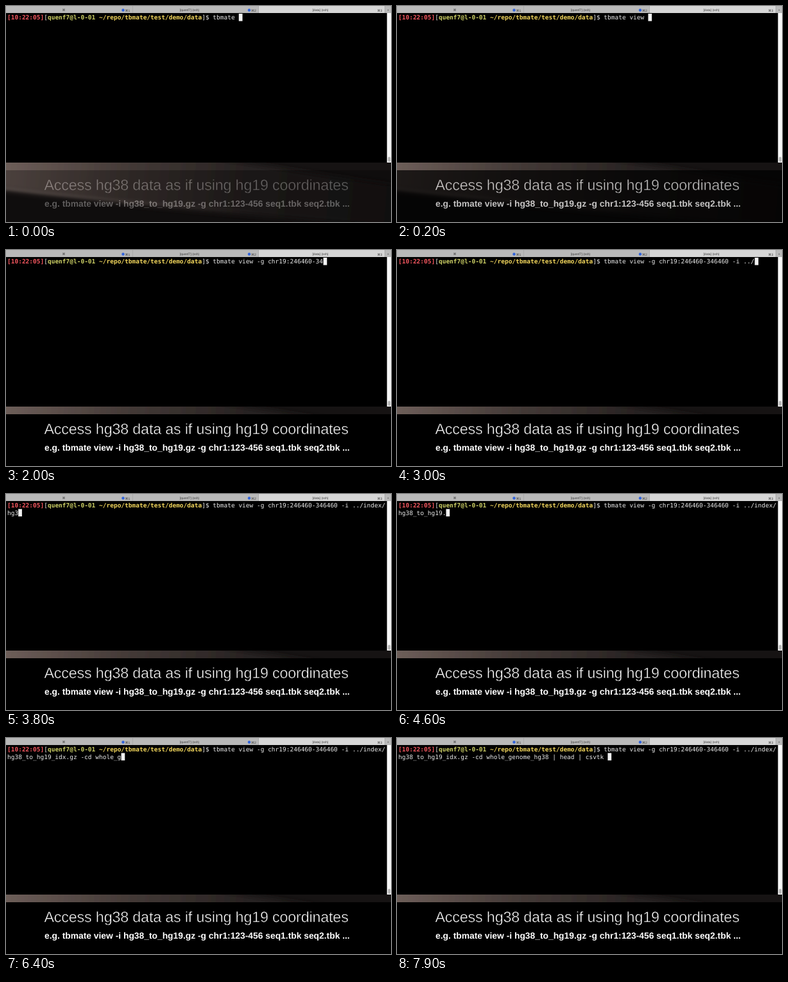
An HTML page that plays this animation: 600 px wide and 338 px high, repeating every 8 s.

```html
<!DOCTYPE html>
<html lang="en">
<head>
<meta charset="utf-8">
<title>Terminal demo</title>
<style>
  html, body { margin: 0; width: 100%; height: 100%; overflow: hidden; background: #000; }
  svg { display: block; width: 600px; height: 338px; }
  text { white-space: pre; text-rendering: geometricPrecision; }
  .term { font: 9.512px "DejaVu Sans Mono", monospace; fill: #e8e8e8; }
  .time { fill: #f4575f; font-weight: bold; }
  .user { fill: #cdd065; font-weight: bold; }
  .path { fill: #f2d65c; font-weight: bold; }
  .tab { font: 5px "Liberation Sans", "DejaVu Sans", sans-serif; fill: #3c3c3c; text-anchor: middle; }
  .title { font: 23.3px "Liberation Sans", Arial, sans-serif; letter-spacing: -.17px; fill: #fff; stroke: #000; stroke-width: .5; }
  .example { font: bold 13.84px "Liberation Sans", Arial, sans-serif; fill: #fff; }
</style>
</head>
<body>
<svg viewBox="0 0 600 338">
  <defs>
    <linearGradient id="glow" gradientUnits="userSpaceOnUse" x1="0" y1="250" x2="600" y2="300">
      <stop offset="0" stop-color="#6d5e59"/>
      <stop offset=".3" stop-color="#453b38"/>
      <stop offset=".6" stop-color="#292423"/>
      <stop offset="1" stop-color="#191616"/>
    </linearGradient>
    <linearGradient id="streak" gradientUnits="userSpaceOnUse" x1="0" y1="0" x2="400" y2="0">
      <stop offset="0" stop-color="#8c7d77" stop-opacity=".7"/>
      <stop offset="1" stop-color="#8c7d77" stop-opacity="0"/>
    </linearGradient>
    <filter id="soft" x="-20%" y="-50%" width="140%" height="200%"><feGaussianBlur stdDeviation="5"/></filter>
    <filter id="fine" x="-20%" y="-50%" width="140%" height="200%"><feGaussianBlur stdDeviation="2"/></filter>
  </defs>

  <!-- desktop -->
  <rect y="245" width="600" height="93" fill="#161313"/>
  <path d="M-30 215H190Q400 252 640 285V348Q250 320 -30 284Z" fill="url(#glow)" filter="url(#soft)"/>
  <path d="M-20 283Q160 305 400 324" fill="none" stroke="url(#streak)" stroke-width="4" filter="url(#fine)"/>

  <g id="caption">
    <rect y="257" width="600" height="81"/>
    <text class="title" x="59.5" y="288">Access hg38 data as if using hg19 coordinates</text>
    <text class="example" x="60" y="313.7">e.g. tbmate view -i hg38_to_hg19.gz -g chr1:123-456 seq1.tbk seq2.tbk ...</text>
  </g>

  <!-- terminal window -->
  <rect width="600" height="245"/>
  <rect width="600" height="11" fill="#b9b9b9"/>
  <rect x="394" width="196" height="11" fill="#d6d6d6"/>
  <path d="M197.5 0V11M393.5 0V11M590.5 0V11" stroke="#a4a4a4" stroke-width=".7"/>
  <g class="tab">
    <text x="90" y="8">⌘</text>
    <text x="286" y="8">[quenf7] (ssh)</text>
    <text x="490" y="8">[data] (ssh)</text>
    <text x="189.5" y="8.5">⌘1</text>
    <text x="386" y="8.5">⌘2</text>
    <text x="582.5" y="8.5">⌘3</text>
    <text x="595.5" y="8">+</text>
  </g>
  <g fill="#2f62dc"><circle cx="182.5" cy="6.5" r="2.2"/><circle cx="379" cy="6.5" r="2.2"/></g>
  <rect x="593.7" y="11" width="6.3" height="234" fill="#f7f7f7"/>
  <rect x="595.2" y="236" width="3.8" height="8" rx="1.9" fill="#b5b5b5"/>

  <text class="term" x="2" y="21.2"><tspan class="time">[10:22:05]</tspan>[<tspan class="user">quenf7@l-0-01</tspan> <tspan class="path">~/repo/tbmate/test/demo/data</tspan>]$ <tspan id="line1"></tspan></text>
  <text class="term" id="line2" x="2" y="32.7"></text>
  <rect id="cursor" width="5.73" height="11.6" fill="#f2f2f2"/>
</svg>
<script>
const LOOP = 8000, CELL = 5.727, PROMPT = 56, WRAP = 47;
const START = "tbmate view -g chr19:246460-346460 -i ../index/hg38_to_hg19";
const FIRST_TRY = START + ".";
const FINAL = START + "_idx.gz -cd whole_genome_hg38 | head | csvtk ";
const CORRECTED = 47;

// [tenths of a second, characters typed]
const KEYS = [
  [0, 7], [2, 12], [10, 21], [18, 28], [24, 34], [25, 34], [30, 41], [32, 46], [33, 46],
  [34, 47], [35, 47], [41, 53], [42, 53], [44, 60], [46, 60], [47, 59], [54, 67], [58, 76],
  [60, 76], [64, 78], [66, 88], [68, 88], [77, 100], [79, 104], [80, 104]
];

const $ = id => document.getElementById(id);
const line1 = $("line1"), line2 = $("line2"), cursor = $("cursor"), caption = $("caption");

function typedLength(step) {
  const i = KEYS.findIndex(k => k[0] > step);
  const [t0, n0] = KEYS[i - 1], [t1, n1] = KEYS[i];
  return Math.floor(n0 + (n1 - n0) * (step - t0) / (t1 - t0) + 1e-6);
}

function draw() {
  const step = Math.floor(performance.now() % LOOP / 100);
  const count = typedLength(step);
  const typed = (step < CORRECTED ? FIRST_TRY : FINAL).slice(0, count);
  const wrapped = count >= WRAP;
  line1.textContent = typed.slice(0, WRAP);
  line2.textContent = typed.slice(WRAP);
  cursor.setAttribute("x", 2 + CELL * (wrapped ? count - WRAP : PROMPT + count));
  cursor.setAttribute("y", wrapped ? 23.5 : 12);
  caption.setAttribute("opacity", Math.min(1, .3 + step * .215));
  requestAnimationFrame(draw);
}
draw();
</script>
</body>
</html>
```
